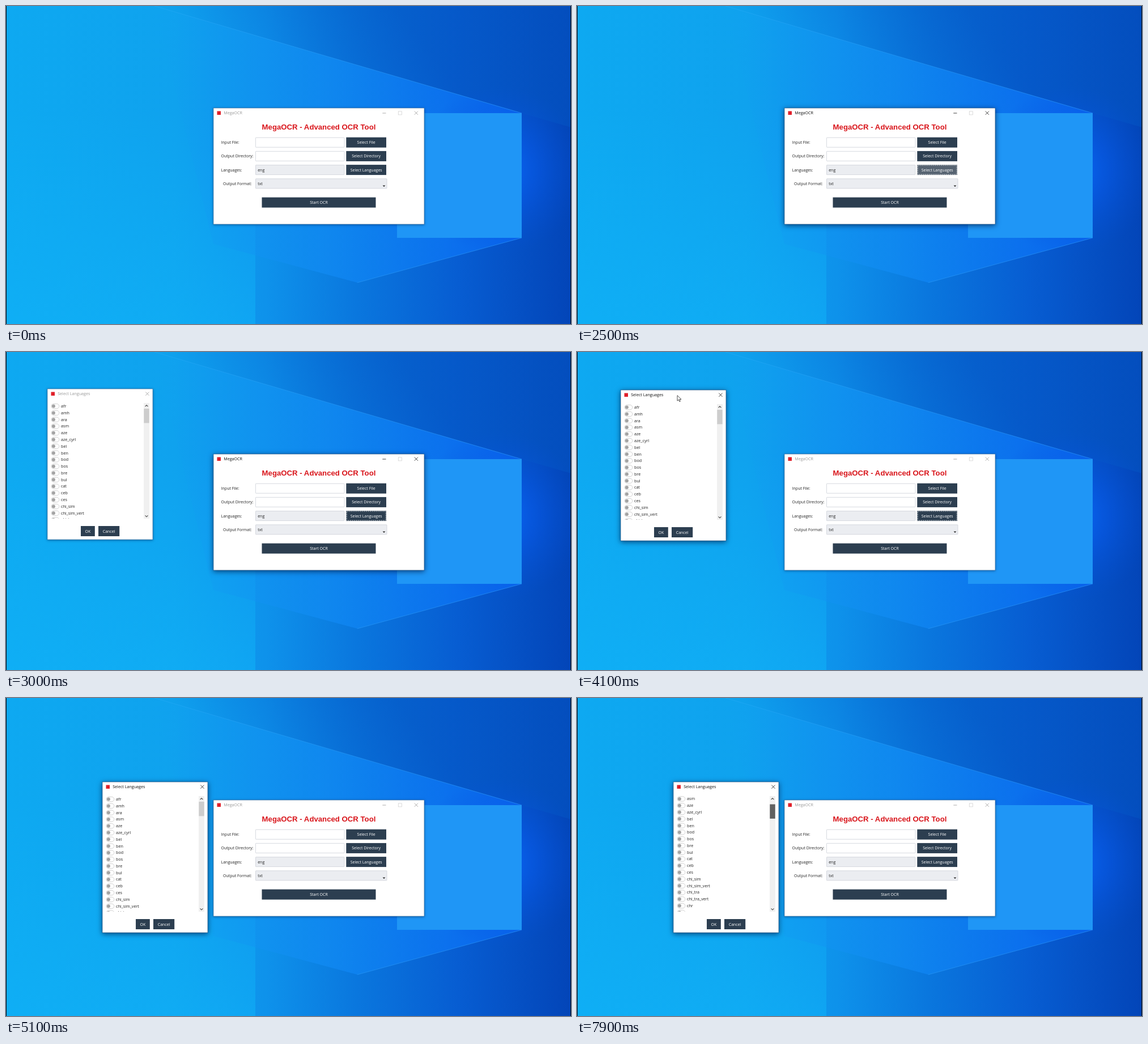
These frames come from a looping animation (997 px wide and 561 px high, 8000 ms). An HTML page:

```html
<!DOCTYPE html>
<html lang="en">
<head>
<meta charset="utf-8">
<title>OCR tool</title>
<style>
html, body { margin: 0; width: 100%; height: 100%; overflow: hidden; background: #000; }
svg { display: block; width: 100vw; height: 100vh; }
text { font: 7px "Open Sans", "Noto Sans", sans-serif; fill: #222; white-space: pre; }
.caption, .row { font-size: 7.15px; }
.heading { font: bold 13.2px "Liberation Sans", Arial, sans-serif; fill: #d9161c; }
.button { fill: #2c3e50; }
.label { fill: #fff; text-anchor: middle; }
.frame { fill: #fff; stroke: #3f6f9c; stroke-width: .7; filter: drop-shadow(0 1px 2px #00285c80); }
.active .frame { stroke: #24527f; filter: drop-shadow(0 2px 5px #001c48b8); }
.caption { fill: #999; }
.active .caption { fill: #111; }
.control { fill: none; stroke: #999; stroke-width: .8; }
.active .control { stroke: #111; }
.off, .active .off { stroke: #d2d2d2; }
.chevron { fill: none; stroke: #444; stroke-width: 1.1; }
</style>
</head>
<body>
<svg id="stage" viewBox="0 0 997 561" preserveAspectRatio="none">
  <defs>
    <linearGradient id="sky">
      <stop offset="0" stop-color="#0ea9f1"/>
      <stop offset=".3" stop-color="#0fa2ee"/>
      <stop offset=".46" stop-color="#0e92eb"/>
      <stop offset=".62" stop-color="#0a77de"/>
      <stop offset=".8" stop-color="#075dd2"/>
      <stop offset="1" stop-color="#0345b8"/>
    </linearGradient>
    <linearGradient id="shade" gradientUnits="userSpaceOnUse" x1="380" y1="140" x2="640" y2="-60">
      <stop offset="0" stop-color="#0560cc" stop-opacity="0"/>
      <stop offset="1" stop-color="#0455c2" stop-opacity=".55"/>
    </linearGradient>
    <linearGradient id="beam" gradientUnits="userSpaceOnUse" x1="260" y1="0" x2="910" y2="0">
      <stop offset="0" stop-color="#149cf2" stop-opacity="0"/>
      <stop offset=".45" stop-color="#118cf4" stop-opacity=".7"/>
      <stop offset="1" stop-color="#0a68f4" stop-opacity=".85"/>
    </linearGradient>
    <linearGradient id="edge" gradientUnits="userSpaceOnUse" x1="260" y1="0" x2="910" y2="0">
      <stop offset="0" stop-color="#40b4ff" stop-opacity=".3"/>
      <stop offset="1" stop-color="#2d9cff" stop-opacity=".75"/>
    </linearGradient>
    <linearGradient id="floor" x1="0" y1="0" x2="0" y2="1">
      <stop offset="0" stop-color="#10b3f8" stop-opacity="0"/>
      <stop offset="1" stop-color="#10b3f8" stop-opacity=".55"/>
    </linearGradient>
    <radialGradient id="glow" gradientUnits="userSpaceOnUse" cx="870" cy="290" r="150">
      <stop offset="0" stop-color="#0b6cff" stop-opacity=".85"/>
      <stop offset=".45" stop-color="#085cf0" stop-opacity=".5"/>
      <stop offset="1" stop-color="#0650d8" stop-opacity="0"/>
    </radialGradient>
    <clipPath id="listClip"><rect x="5" y="25" width="163" height="204"/></clipPath>
  </defs>
  <rect width="997" height="561" fill="url(#sky)"/>
  <rect y="180" width="440" height="381" fill="url(#floor)"/>
  <path d="M262 0H997V214L910 189Z" fill="url(#shade)"/>
  <path d="M262 0L910 189V409L620 488L366 420Z" fill="url(#beam)"/>
  <rect x="700" y="120" width="297" height="340" fill="url(#glow)"/>
  <path d="M262 0L910 189M910 409L620 488" fill="none" stroke="url(#edge)" stroke-width=".8"/>
  <rect x="690" y="189" width="220" height="220" fill="#1f96f6"/>
  <path d="M.5 0V561M996.5 0V561" stroke="#02060c"/>
</svg>
<script>
const NS = "http://www.w3.org/2000/svg";
const stage = document.getElementById("stage");

function add(parent, tag, attrs, content) {
  const node = document.createElementNS(NS, tag);
  for (const key in attrs) node.setAttribute(key, attrs[key]);
  if (content) node.textContent = content;
  return parent.appendChild(node);
}
const group = (parent, attrs) => add(parent, "g", attrs);
const rect = (parent, x, y, width, height, attrs) =>
  add(parent, "rect", { x, y, width, height, ...attrs });
const path = (parent, d, attrs) => add(parent, "path", { d, ...attrs });
const text = (parent, x, y, content, cls = "") =>
  add(parent, "text", { x, y, class: cls }, content);

function button(parent, x, y, w, h, label) {
  const face = rect(parent, x, y, w, h, { class: "button" });
  text(parent, x + w / 2, y + h / 2 + 2.5, label, "label");
  return face;
}

// Each window is laid out from its own top left corner.
function makeWindow(w, h, caption) {
  const win = group(stage);
  rect(win, 0, 0, w, h, { class: "frame" });
  rect(win, 6.5, 5.5, 6.5, 6.5, { fill: "#e0202a" });
  text(win, 18.2, 11.4, caption, "caption");
  const cx = w - 14.2 + (w < 200 ? 4.6 : 0);
  path(win, `M${cx - 3.1} 5.6l6.2 6.2m0 -6.2l-6.2 6.2`, { class: "control" });
  return win;
}

function makeMain() {
  const win = makeWindow(372, 205, "MegaOCR");
  win.setAttribute("transform", "translate(366 180)");
  path(win, "M298.3 9h6.2", { class: "control" });
  rect(win, 326.3, 5.9, 6, 6, { class: "control off" });
  add(win, "text", { x: 186, y: 38, class: "heading", "text-anchor": "middle" },
    "MegaOCR - Advanced OCR Tool");

  const field = (y, w, fill, value) => {
    rect(win, 74.5, y - 8.5, w, 17, { fill, stroke: "#cdd1d9", "stroke-width": .8, rx: .5 });
    if (value) text(win, 78.2, y + 2.5, value);
  };
  const rows = [
    ["Input File:", "Select File", "#fff", ""],
    ["Output Directory:", "Select Directory", "#fff", ""],
    ["Languages:", "Select Languages", "#ebedf1", "eng"]
  ];
  let face;
  rows.forEach(([label, action, fill, value], i) => {
    const y = 60.7 + i * 24.2;
    text(win, 13.6, y + 2.5, label);
    field(y, 156.5, fill, value);
    face = button(win, 234.3, y - 9, 70.7, 18, action);
  });
  text(win, 17, 135.8, "Output Format:");
  field(133.3, 231.5, "#ebedf1", "txt");
  path(win, "M298.6 136.6h4.8l-2.4 2.5z", { fill: "#222" });
  button(win, 85.5, 157.6, 201, 18, "Start OCR");
  const ring = rect(win, 235.2, 101, 68.9, 16.2, {
    fill: "none", stroke: "#fff", "stroke-width": .8, "stroke-dasharray": "2 1.4"
  });
  return { win, face, ring };
}

function makeDialog() {
  const win = makeWindow(186, 266, "Select Languages");
  const clip = group(win, { "clip-path": "url(#listClip)" });
  const list = group(clip);
  const codes = ("afr amh ara asm aze aze_cyrl bel ben bod bos bre bul cat ceb ces " +
    "chi_sim chi_sim_vert chi_tra chi_tra_vert chr cos cym").split(" ");
  codes.forEach((code, i) => {
    const y = 30.6 + i * 11.79;
    rect(list, 7, y - 4.2, 13.8, 8.4, { rx: 4.2, fill: "#fff", stroke: "#c4c4c4", "stroke-width": .8 });
    add(list, "circle", { cx: 10.9, cy: y, r: 3, fill: "#a3a3a3" });
    text(list, 24, y + 2.4, code, "row");
  });
  rect(win, 170, 25, 10, 204, { fill: "#f0f0f0" });
  path(win, "M172.6 31.2l2.4 -2.4l2.4 2.4M172.6 223.4l2.4 2.4l2.4 -2.4", { class: "chevron" });
  const thumb = rect(win, 170.3, 35, 9.4, 25.3);
  button(win, 59, 242, 24.8, 18, "OK");
  button(win, 90, 242, 37.2, 18, "Cancel");
  return { win, list, thumb };
}

const main = makeMain();
const dialog = makeDialog();
const cursor = path(stage, "M0 0V9.6L2.3 7.5L3.8 11L5.4 10.3L3.9 6.9H7Z",
  { fill: "#fff", stroke: "#222", "stroke-width": .8 });

// Drag path: time, x, y, and the easing that leads to that point.
const drag = [
  [4000, 73, 65],
  [4100, 77, 67, u => u],
  [4500, 120, 112, u => u ** 1.15],
  [4900, 170, 148, u => 1 - (1 - u) ** 1.5]
];

function dialogPlace(t) {
  const i = drag.findIndex(p => t < p[0]);
  if (i === 0) return drag[0].slice(1, 3);
  if (i < 0) return drag[drag.length - 1].slice(1, 3);
  const [t0, x0, y0] = drag[i - 1];
  const [t1, x1, y1, ease] = drag[i];
  const k = ease((t - t0) / (t1 - t0));
  return [x0 + (x1 - x0) * k, y0 + (y1 - y0) * k];
}

const between = (t, from, to) => t >= from && t < to;
const clamp = v => Math.max(0, Math.min(1, v));
const show = (node, on) => node.setAttribute("visibility", on ? "visible" : "hidden");

function draw(time) {
  const t = Math.floor(time / 100) * 100;

  main.win.classList.toggle("active", between(t, 2500, 3700));
  main.face.style.fill = between(t, 2500, 2700) ? "#566371" : "";
  show(main.ring, between(t, 2500, 4200));

  const [x, y] = dialogPlace(t);
  const opening = clamp((t - 2600) / 300);
  const scale = .9 + .1 * opening;
  dialog.win.setAttribute("transform",
    `translate(${x + 93 * (1 - scale)} ${y + 133 * (1 - scale)}) scale(${scale})`);
  dialog.win.setAttribute("opacity", opening);
  dialog.win.classList.toggle("active", t >= 3700);

  const scroll = 36 * clamp((t - 7600) / 300);
  dialog.list.setAttribute("transform", `translate(0 ${-scroll})`);
  dialog.thumb.setAttribute("y", 35 + scroll / 8);
  dialog.thumb.setAttribute("fill", t >= 7700 ? "#606060" : t >= 7300 ? "#a6a6a6" : "#cdcdcd");

  cursor.setAttribute("transform", `translate(${x + 100} ${y + 9.6})`);
  show(cursor, between(t, 3700, 5000));
}

function tick(now) {
  draw(now % 8000);
  requestAnimationFrame(tick);
}
draw(0);
requestAnimationFrame(tick);
</script>
</body>
</html>
```
